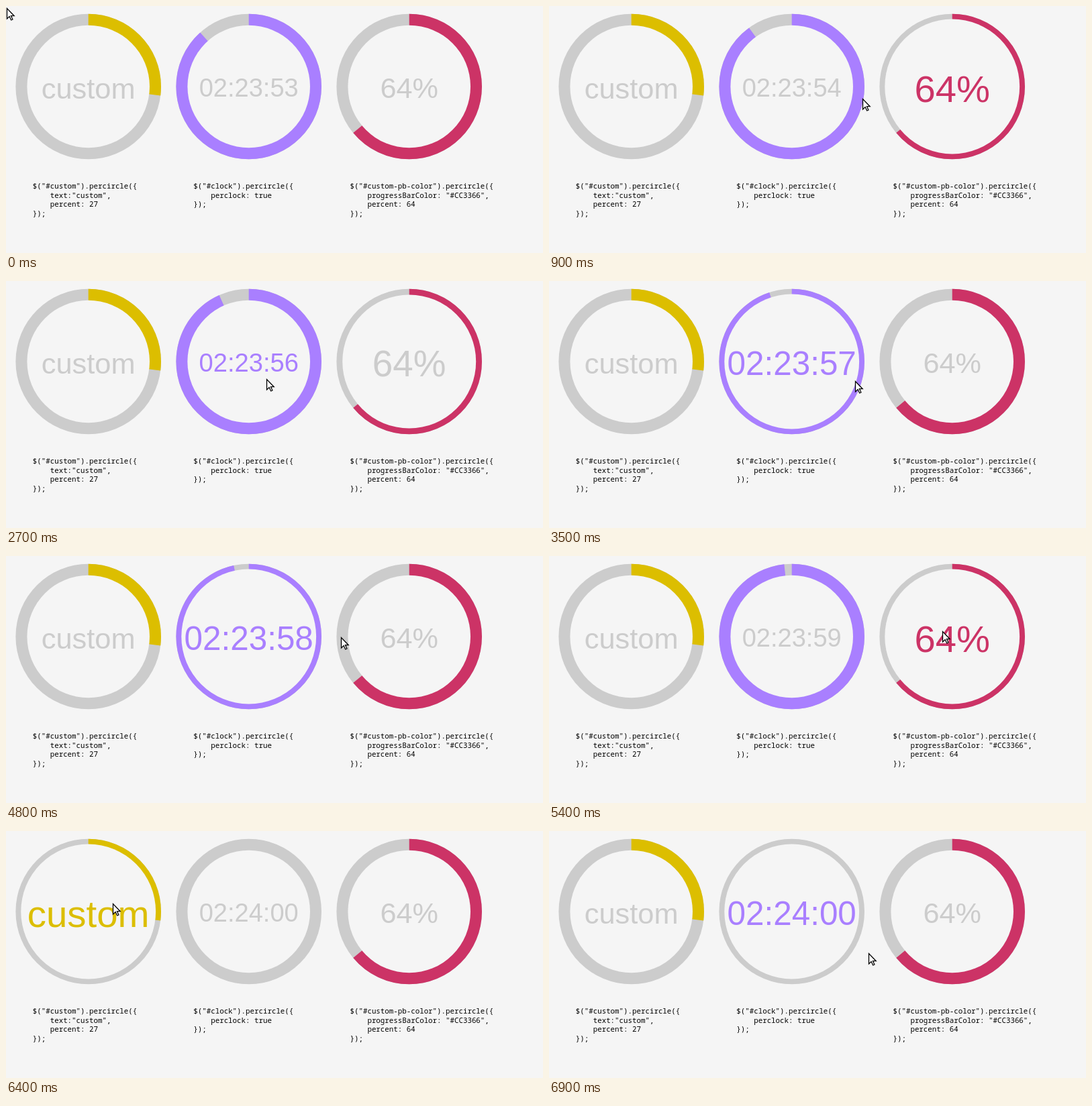
These frames come from a looping animation (800 px wide and 368 px high, 7000 ms). An HTML page with a canvas:

```html
<!DOCTYPE html>
<html lang="en">
<head>
<meta charset="utf-8">
<title>Progress circles</title>
<style>
  html, body { margin: 0; width: 100%; height: 100%; overflow: hidden; background: #f5f5f5; }
  canvas { display: block; width: 800px; height: 368px; }
</style>
</head>
<body>
<canvas id="stage" width="800" height="368"></canvas>
<script>
const ctx = document.getElementById('stage').getContext('2d');
const LOOP = 7000, STEP = 100, FADE = 200, LAG = 50, TICK = 10;
const GREY = '#cccccc', PAPER = '#f5f5f5';
const FIRST_X = 122.7, SPACING = 239, CY = 120, RADIUS = 108.3, HOLE = 91.3;

const dials = [
  { color: '#dcbe00', size: 43.4, codeX: 39.8,
    label: () => 'custom', part: () => 0.27,
    code: ['$("#custom").percircle({', '    text:"custom",', '    percent: 27', '});'] },
  { color: '#a97fff', size: 38, codeX: 279.3,
    label: t => clockText(seconds(t)), part: t => seconds(t) % 60 / 60,
    code: ['$("#clock").percircle({', '    perclock: true', '});'] },
  { color: '#cc3366', size: 43.2, codeX: 512.5,
    label: () => '64%', part: () => 0.64,
    code: ['$("#custom-pb-color").percircle({', '    progressBarColor: "#CC3366",', '    percent: 64', '});'] }
];
dials.forEach((dial, i) => { dial.x = FIRST_X + SPACING * i; });

// turning points of the pointer: time, x, y
const route = [
  [0, 1, 3], [750, 690, 140], [1100, 170, 135], [1600, 361, 147],
  [2500, 620, 142], [2700, 388, 146], [3500, 456, 149], [4650, 400, 130],
  [4800, 499, 121], [5500, 600, 110], [6000, 231, 96], [6450, 150, 110],
  [6900, 476, 182], [LOOP, 520, 192]
];

function seconds(t) {
  return 53 + Math.floor((t + 700) / 1000);
}

function clockText(s) {
  return `02:${23 + Math.floor(s / 60)}:${String(s % 60).padStart(2, '0')}`;
}

function ease(k) {
  return k * k * (3 - 2 * k);
}

function pointerAt(t) {
  const i = Math.max(1, route.findIndex(p => p[0] >= t));
  const [t0, x0, y0] = route[i - 1], [t1, x1, y1] = route[i];
  const k = (t - t0) / (t1 - t0);
  return [x0 + (x1 - x0) * k, y0 + (y1 - y0) * k];
}

function isOver(dial, t) {
  const [x, y] = pointerAt(Math.max(0, t - LAG));
  return Math.hypot(x - dial.x, y - CY) < RADIUS;
}

// replays the pointer from the loop start, so the result depends on t alone
function hoverAmount(dial, t) {
  let k = 0;
  for (let u = 0; u < t; u += TICK) {
    k += (isOver(dial, u) ? TICK : -TICK) / FADE;
    k = Math.min(1, Math.max(0, k));
  }
  return ease(k);
}

function disc(x, radius, color, part = 1) {
  ctx.beginPath();
  if (part < 1) ctx.moveTo(x, CY);
  ctx.arc(x, CY, radius, -Math.PI / 2, -Math.PI / 2 + part * 2 * Math.PI);
  ctx.fillStyle = color;
  ctx.fill();
}

function drawDial(dial, t) {
  const amount = hoverAmount(dial, t);
  disc(dial.x, RADIUS, GREY);
  disc(dial.x, RADIUS, dial.color, dial.part(t));
  disc(dial.x, HOLE * (1 + 0.1 * amount), PAPER);

  const size = dial.size * (1 + 0.3 * amount);
  ctx.font = `${size}px "Liberation Sans", Arial, sans-serif`;
  ctx.textAlign = 'center';
  ctx.fillStyle = isOver(dial, t) ? dial.color : GREY;
  ctx.fillText(dial.label(t), dial.x, CY + 0.405 * size);
}

function drawCode({ code, codeX }) {
  ctx.font = '10.8px "Noto Sans Mono", monospace';
  ctx.textAlign = 'left';
  ctx.fillStyle = '#000';
  code.forEach((line, i) => ctx.fillText(line, codeX, 272 + 13.7 * i));
}

const arrow = new Path2D('M0 0V15.5L3.6 12L6.2 17.5L8.4 16.5L6 11.2H10.7Z');

function drawPointer(t) {
  const [x, y] = pointerAt(t).map(Math.round);
  ctx.save();
  ctx.translate(x + 0.5, y + 0.5);
  ctx.fillStyle = '#fff';
  ctx.strokeStyle = '#000';
  ctx.lineWidth = 1.3;
  ctx.fill(arrow);
  ctx.stroke(arrow);
  ctx.restore();
}

function draw(t) {
  ctx.fillStyle = PAPER;
  ctx.fillRect(0, 0, 800, 368);
  for (const dial of dials) {
    drawDial(dial, t);
    drawCode(dial);
  }
  drawPointer(t);
}

const start = performance.now();
function tick() {
  const t = (performance.now() - start) % LOOP;
  draw(Math.floor(t / STEP) * STEP);
  requestAnimationFrame(tick);
}
tick();
</script>
</body>
</html>
```
